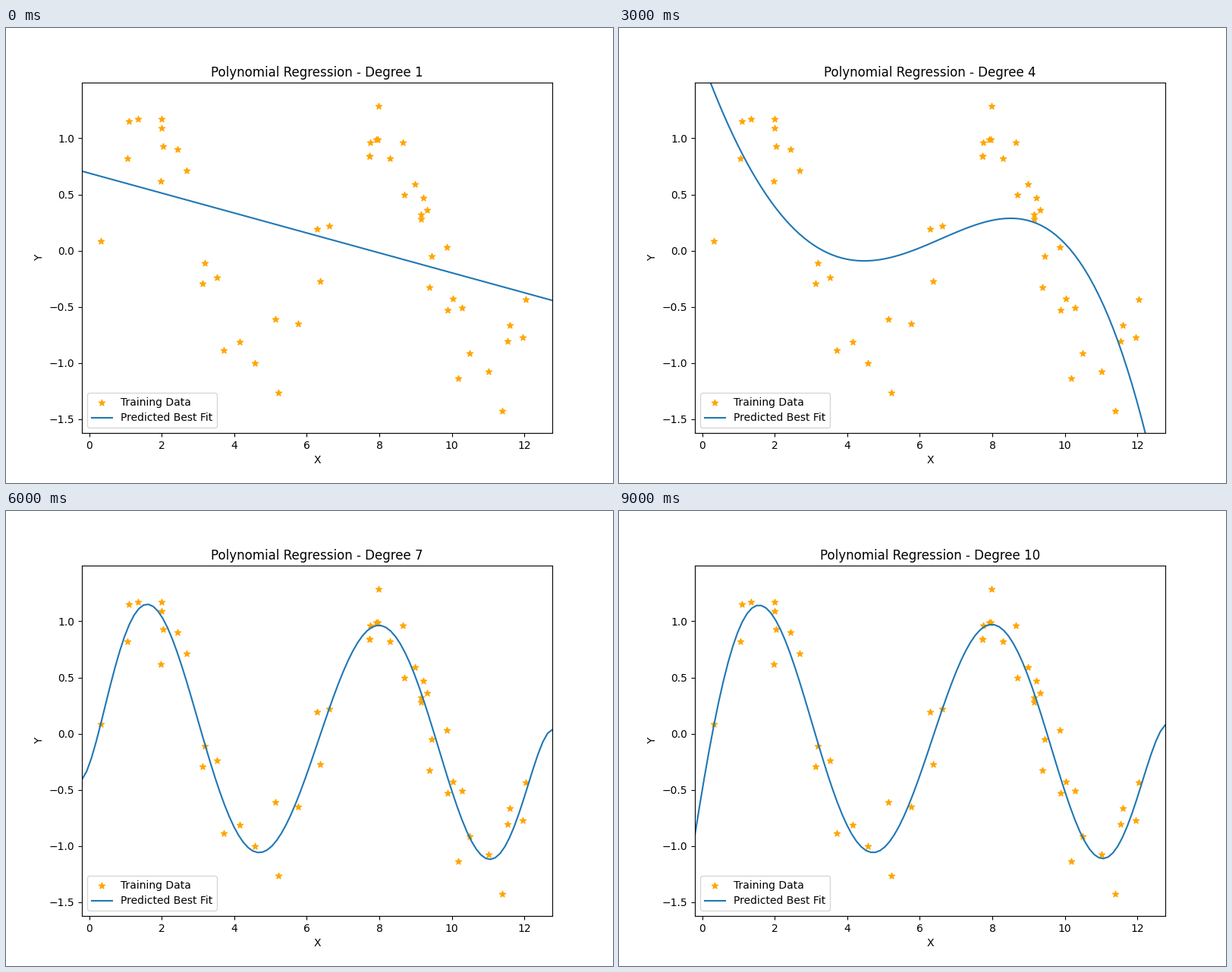
A matplotlib script for the animation above (10 s loop, 800 by 600 pixels).

```python
import numpy as np
import matplotlib.pyplot as plt
from matplotlib.animation import FuncAnimation
from numpy.polynomial import Polynomial

# Noisy samples of a sine wave over two periods
X = np.array([
    0.333, 1.065, 1.107, 1.358, 1.985, 2.006, 2.006, 2.048, 2.445, 2.696,
    3.115, 3.198, 3.533, 3.721, 4.160, 4.578, 5.143, 5.227, 5.770, 6.293,
    6.377, 6.628, 7.736, 7.736, 7.757, 7.924, 7.966, 7.987, 8.301, 8.656,
    8.698, 8.991, 9.158, 9.158, 9.221, 9.326, 9.388, 9.451, 9.869, 9.890,
    10.037, 10.183, 10.288, 10.497, 11.019, 11.396, 11.542, 11.605, 11.960,
    12.044])
Y = np.array([
    0.088, 0.824, 1.149, 1.169, 0.615, 1.169, 1.088, 0.932, 0.899, 0.710,
    -0.296, -0.114, -0.236, -0.884, -0.816, -1.005, -0.607, -1.262, -0.648,
    0.190, -0.276, 0.217, 0.838, 0.838, 0.966, 0.987, 0.987, 1.290, 0.818,
    0.966, 0.494, 0.588, 0.318, 0.284, 0.473, 0.365, -0.330, -0.053, 0.034,
    -0.526, -0.431, -1.134, -0.506, -0.911, -1.073, -1.424, -0.803, -0.661,
    -0.769, -0.438])

DEGREES = 10
X_LIM = (-0.2, 4 * np.pi + 0.2)
Y_LIM = (-1.623, 1.496)

plt.rcParams["font.family"] = "DejaVu Sans"
fig, ax = plt.subplots(figsize=(8, 6), dpi=100)
grid = np.linspace(*X_LIM, 100)

ax.scatter(X, Y, color="orange", marker="*", label="Training Data")
line, = ax.plot([], [], color="tab:blue", label="Predicted Best Fit")
ax.set(xlim=X_LIM, ylim=Y_LIM, xlabel="X", ylabel="Y")
ax.legend(loc="lower left")


def update(i):
    degree = i + 1
    line.set_data(grid, Polynomial.fit(X, Y, degree)(grid))
    ax.set_title(f"Polynomial Regression - Degree {degree}")
    return line,


anim = FuncAnimation(fig, update, frames=DEGREES, interval=1000, repeat=True)
plt.show()
```
